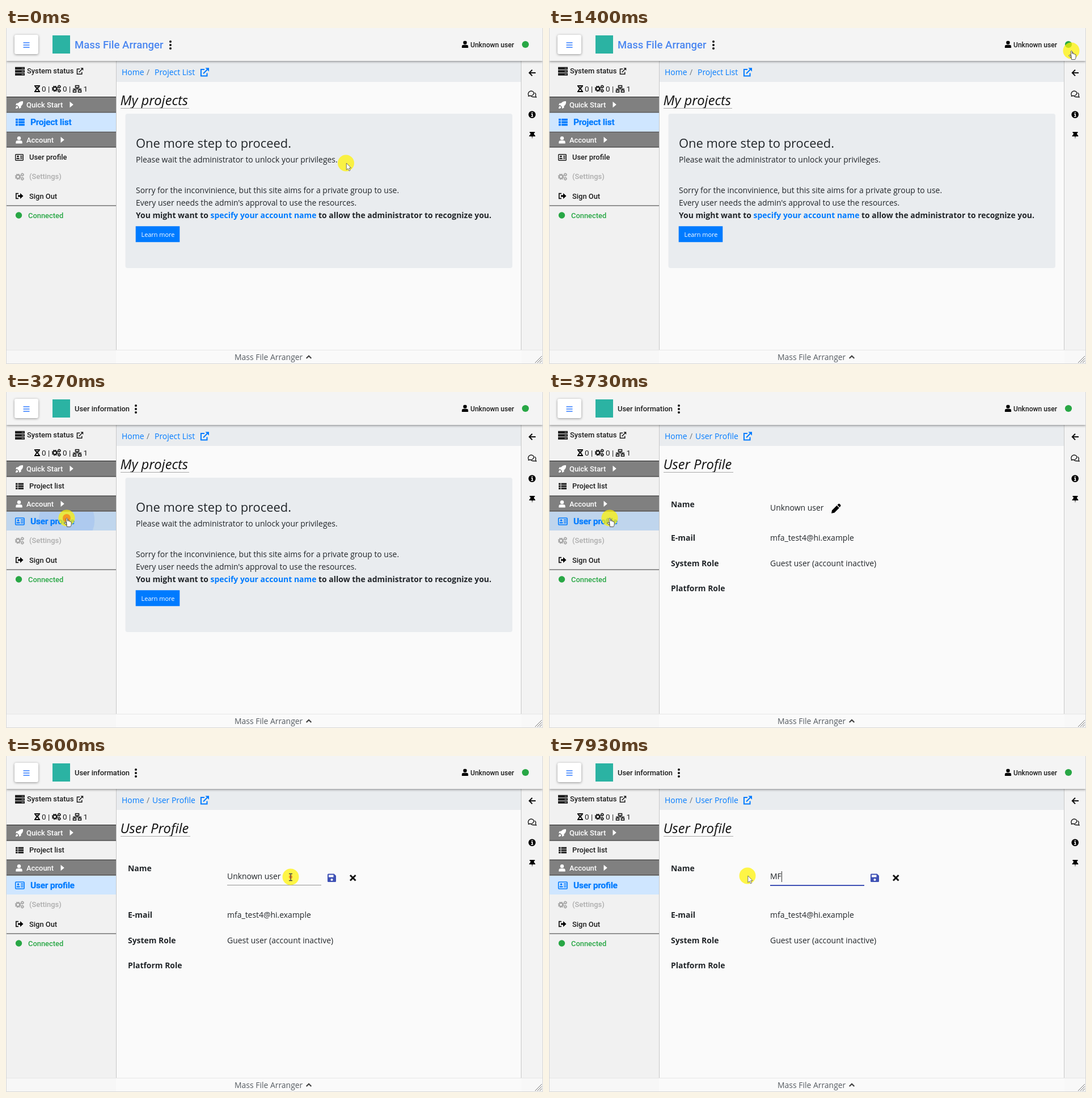
Write an HTML page that moves like this. It is 947x592 px and loops after 8 s.

```html
<!DOCTYPE html>
<html lang="en">
<head>
<meta charset="utf-8">
<title>User profile walkthrough</title>
<style>
html, body { margin: 0; width: 947px; height: 592px; overflow: hidden; background: #fafafa; }
svg { display: block; }
text { font: 13.95px "Open Sans", sans-serif; fill: #212529; white-space: pre; }
.ui text { font: 500 12.9px Roboto, sans-serif; fill: #1c1c1c; }
.bold { font-weight: 700; }
.head { font-size: 23.8px; font-style: italic; fill: #111; }
.link { fill: #007bff; }
.line { fill: none; stroke: #111; stroke-width: 1.7; }
.ui .light { fill: #fff; }
.ui .muted { fill: #adadad; color: #a5a5a5; }
.ui .green { fill: #28a745; }
.ui text.brand { font-size: 18.5px; fill: #4a86f0; }
.row { fill: none; }
.icon { transform-box: fill-box; transform-origin: 0 50%; }
.sel .row { fill: #cfe6ff; }
.sel .icon { transform: scale(1.13); color: #007bff; }
.sel text { font-size: 15.1px; fill: #007bff; transform: translate(2px, 1px); text-shadow: 0 0 2px #5aa9ff99, .4px 0 #007bff; }
</style>
</head>
<body>
<svg width="947" height="592" viewBox="0 0 947 592">
<defs>
  <symbol id="gears" viewBox="0 0 17 14" width="17" height="14">
    <g fill="none" stroke="currentColor">
      <circle cx="5.6" cy="7" r="3.2" stroke-width="2.4"/>
      <circle cx="5.6" cy="7" r="4.6" stroke-width="1.6" stroke-dasharray="2 1.61"/>
      <g id="cog"><circle cx="13.3" cy="3.4" r="1.8" stroke-width="1.5"/>
      <circle cx="13.3" cy="3.4" r="2.7" stroke-width="1" stroke-dasharray="1.4 1.43"/></g>
      <use href="#cog" y="7.2"/>
    </g>
  </symbol>
  <symbol id="external" viewBox="0 0 16 16" width="16" height="16">
    <path d="M8 3H1.9V14.4H12.5V9.5M6 10.3 13.5 2.6" fill="none" stroke="currentColor" stroke-width="2"/>
    <path d="M9.5.3H16V6.8Z" fill="currentColor"/>
  </symbol>
  <symbol id="person" viewBox="0 0 12 13" width="12" height="13">
    <circle cx="6" cy="3.3" r="3.2" fill="currentColor"/>
    <path d="M.3 12.6V10.5Q.3 7.4 3.3 7.3H8.7Q11.7 7.4 11.7 10.5V12.6Z" fill="currentColor"/>
  </symbol>
  <clipPath id="rowClip"><path d="M1 211H194V244H1Z"/></clipPath>
</defs>

<rect width="947" height="592" fill="#fafafa"/>
<path d="M0 58H194V592H0Z" fill="#f1f1f1"/>
<path d="M909 58H947V592H909Z" fill="#f3f3f3"/>
<path d="M195 58H908V95H195Z" fill="#e9ecef"/>
<path d="M194.5 58V567M908.5 58V567" stroke="#c8c8c8"/>
<path d="M0 0H947V58H0Z" fill="#f4f4f4" style="filter:drop-shadow(0 1px 2px #0007)"/>

<!-- header -->
<g class="ui">
  <rect x="15" y="12" width="42" height="34" rx="3" fill="#fff" style="filter:drop-shadow(0 1px 2px #0006)"/>
  <path d="M30.5 26H41.5M30.5 30H41.5M30.5 34H41.5" stroke="#2f7bff" stroke-width="1.6"/>
  <rect x="82" y="13" width="31" height="32" fill="#2bb3a3"/>
  <text id="title" x="121" y="36" class="brand">Mass File Arranger</text>
  <g id="dots" fill="#111"><circle cx="290" cy="24" r="2"/><circle cx="290" cy="30" r="2"/><circle cx="290" cy="36" r="2"/></g>
  <use href="#person" x="803.5" y="22.5"/>
  <text x="819" y="33.5" style="font-size:12.1px">Unknown user</text>
  <circle cx="916" cy="29" r="6.1" class="green"/>
</g>

<!-- sidebar -->
<g class="ui" color="#1c1c1c">
  <path d="M16 71H33M16 76.3H33M16 81.6H33" stroke="#1c1c1c" stroke-width="4.3"/>
  <path d="M28 71H31M28 76.3H31M28 81.6H31" stroke="#eee" stroke-width="1.2" stroke-dasharray="1"/>
  <text x="37" y="80">System status</text>
  <use href="#external" transform="translate(124 70) scale(.78)"/>
  <path d="M50 101H60V103H59Q59 105.5 56.2 107 59 108.5 59 111H60V113H50V111H51Q51 108.5 53.8 107 51 105.5 51 103H50Z"/>
  <path d="M52.5 103H57.5L57 104.3H53ZM53 111Q53 109 55 108.3 57 109 57 111Z" fill="#f1f1f1"/>
  <text y="112" style="font-weight:400;font-size:13.5px"><tspan x="63">0 |</tspan><tspan x="100">0 |</tspan><tspan x="136.5">1</tspan></text>
  <use href="#gears" x="80.5" y="100"/>
  <path d="M122.5 101.5H128.5V105H122.5ZM118.5 109.5H123.5V113H118.5ZM127.5 109.5H132.5V113H127.5Z" class="line" style="stroke-width:1.5"/>
  <path d="M125.5 105V107.3M118 107.3H133M121 107.3V109.5M130 107.3V109.5" class="line" style="stroke-width:1.2"/>

  <path d="M1 121.5H194V149H1ZM1 183H194V210H1Z" fill="#808080"/>
  <path d="M1 121.5H194M1 149H194M1 183H194M1 210H194" stroke="#222"/>
  <path d="M30 129Q24 128.5 21.5 132.5H18.5L17 136H20L23 139V142L26.5 140.5V137.5Q30.5 135 30 129ZM19.5 137.5Q17 138 17 142 21 142 21.5 139.5Z" class="light"/>
  <path d="M112.5 129.7V140.3L118.8 135ZM96.5 191.7V202.3L102.8 197Z" class="light"/>
  <text x="36" y="140" class="light">Quick Start</text>
  <use href="#person" x="17" y="191" color="#fff"/>
  <text x="36" y="202" class="light">Account</text>

  <g id="projects">
    <path d="M1 149.5H194V182.5H1Z" class="row"/>
    <path class="icon" d="M17 160.5H20.5V163.5H17ZM17 164.5H20.5V167.5H17ZM17 168.5H20.5V171.5H17ZM21.5 160.5H31V163.5H21.5ZM21.5 164.5H31V167.5H21.5ZM21.5 168.5H31V171.5H21.5Z" fill="currentColor"/>
    <text x="41" y="170">Project list</text>
  </g>
  <g id="profile">
    <path d="M1 211H194V244H1Z" class="row"/>
    <path id="hover" d="M1 211H194V244H1Z" opacity=".07"/>
    <circle id="ripple" cx="107" cy="226" fill="#0a62ff" clip-path="url(#rowClip)"/>
    <g class="icon">
      <rect x="16.7" y="222.7" width="13.6" height="10.6" rx="1" fill="none" stroke="currentColor" stroke-width="1.4"/>
      <circle cx="21" cy="226.3" r="1.7" fill="currentColor"/>
      <path d="M18.5 231V229H23.5V231ZM25 225H29V226.2H25ZM25 227.3H29V228.5H25ZM25 229.6H29V230.8H25Z" fill="currentColor"/>
    </g>
    <text x="41" y="232">User profile</text>
  </g>
  <g class="muted"><use href="#gears" x="15.5" y="255"/></g>
  <text x="41" y="266" class="muted">(Settings)</text>
  <path d="M22 291.7H17.8V300.3H22" class="line"/>
  <path d="M21 294.5H25V291L30.5 296 25 301V297.5H21Z"/>
  <text x="41" y="300.5">Sign Out</text>
  <path d="M0 313H194" stroke="#333"/>
  <circle cx="22.5" cy="330" r="5.7" class="green"/>
  <text x="39" y="334.5" class="green">Connected</text>
</g>

<!-- right tools -->
<path d="M934 79H923.5M928 73.8 922.8 79 928 84.2" class="line" style="stroke-width:2"/>
<path d="M922 119.5Q919.5 116 922.5 112.5 926 109.5 930 112.5 932 116 928.5 118.5 926 120 923.5 119.3L920.8 120.3ZM932 114Q935.5 116 933.8 119L935 122 931.5 121.3Q928 122 926 120" class="line" style="stroke-width:1.3"/>
<circle cx="927.7" cy="152.5" r="6.3"/>
<path d="M926 151.7H928.3V155.5M926 155.7H929.7M926.7 149.3H928.8" fill="none" stroke="#fff" stroke-width="1.5"/>
<path d="M923.5 183H932.5V185H931L931.5 188Q933.5 189 933.5 191H928.6L928 195.5 927.3 191H922.5Q922.5 189 924.5 188L925 185H923.5Z"/>

<!-- breadcrumb and heading -->
<text x="204" y="83" class="link">Home</text>
<text x="248" y="83" style="fill:#6c757d">/</text>
<text id="crumb" y="83" class="link"></text>
<use href="#external" x="342" y="70" color="#007bff"/>
<text id="heading" x="201.5" y="136" class="head"></text>
<path id="underline" stroke="#aaa"/>

<!-- project list page -->
<g id="listPage">
  <rect x="210.5" y="151" width="682.5" height="272" rx="4" fill="#e9ecef"/>
  <text x="229" y="210.5" style="font-size:21.9px">One more step to proceed.</text>
  <text x="229" y="237">Please wait the administrator to unlock your privileges.</text>
  <text x="229" y="290.5">Sorry for the inconvinience, but this site aims for a private group to use.</text>
  <text x="229" y="313">Every user needs the admin's approval to use the resources.</text>
  <text x="229" y="335" class="bold">You might want to <tspan class="link">specify your account name</tspan> to allow the administrator to recognize you.</text>
  <path d="M228.7 349.2H306.3V377.3H228.7Z" class="link"/>
  <text x="238.5" y="367.8" style="font-size:10.9px;fill:#fff">Learn more</text>
</g>

<!-- profile page -->
<g id="profilePage">
  <text x="215" y="203" class="bold">Name</text>
  <rect id="selection" y="203" height="19" fill="#2f7fe0"/>
  <text id="name" x="390" y="208.5"></text>
  <path id="caret" d="M0 203V222" stroke="#333"/>
  <path id="pencil" d="M498 213.8 499 208.5 507.5 200 511.8 204.3 503.3 212.8ZM508.5 199 510.3 197.2Q511.5 196.3 512.8 197.5L514 198.8Q515 200 514 201.2L512.7 203.3Z"/>
  <g id="editor">
    <path d="M390 227.5H556" stroke="#949494"/>
    <path id="focusLine" stroke="#3f51b5" stroke-width="2"/>
    <path d="M568.5 207.5H578.5L582 211V220.5Q582 222 580.5 222H568.5Q567 222 567 220.5V209Q567 207.5 568.5 207.5Z" fill="#3f51b5"/>
    <path d="M569 209.5H577.5V213.5H569Z" fill="#fafafa"/><circle cx="574.5" cy="218" r="2.1" fill="#fafafa"/>
    <path d="M607 210 616.5 219.5M616.5 210 607 219.5" stroke="#111" stroke-width="3"/>
  </g>
  <g id="details">
    <text y="262"><tspan x="215" class="bold">E-mail</tspan><tspan x="390">mfa_test4@hi.example</tspan></text>
    <text y="306.5"><tspan x="215" class="bold">System Role</tspan><tspan x="390">Guest user (account inactive)</tspan></text>
    <text x="215" y="350.5" class="bold">Platform Role</text>
  </g>
</g>

<!-- footer and frame -->
<path d="M0 567H947V592H0Z" fill="#fafafa" opacity=".75"/>
<path d="M0 567.5H947" stroke="#e6e6e6"/>
<text x="403" y="585" style="fill:#555b61">Mass File Arranger</text>
<path d="M529.7 582 534 577.8 538.3 582" fill="none" stroke="#444" stroke-width="2.3"/>
<path d="M933 590 945 578M937 590 945 582M941 590 945 586" stroke="#777"/>
<path d="M.5 0V591.5H946.5V0" fill="none" stroke="#d6d6d6"/>

<!-- pointer -->
<g id="pointer">
  <circle r="14.5" fill="#fff200" opacity=".72"/>
  <circle id="press" fill="#f58a1f" opacity=".85"/>
  <g stroke-linejoin="round">
    <path id="arrow" d="M.8 0V12L3.6 9.5 5.5 13.8 7.5 12.9 5.6 8.7H9.2Z" fill="#fff" stroke="#555" stroke-width=".8"/>
    <path id="hand" d="M-.8 1Q.3-.8 1.5 1V5.5Q3-.1 4 6 5.5 4.5 6.2 6.5 8.2 5.8 8.2 8V11Q8 13.5 6.7 15.5H.5Q-1-.1-.8 12.5L-4 9Q-4 7-2.3 7.5L-.8 9Z" fill="#fff" stroke="#444" stroke-width=".9"/>
    <path id="ibeam" d="M-3-5.5H3M0-5.5V6.5M-3 6.5H3" fill="none" stroke="#444" stroke-width="1.3"/>
  </g>
</g>
</svg>
<script>
const el = Object.fromEntries([...document.querySelectorAll('[id]')].map(node => [node.id, node]));
const LOOP = 8000, FPS = 15;
const CLICK = 3130, EDIT = 5060, FOCUS = 5660, CLEAR = 6190;

// time, x, y of the pointer
const path = [
  [267, 599.5, 238], [800, 774, 42], [1005, 774, 42], [1400, 921, 40], [1730, 921, 40],
  [1800, 903, 66], [1867, 726, 66], [1933, 674, 47.5], [2150, 674, 47.5], [2867, 107, 222],
  [3930, 107, 222], [4400, 521, 212], [4600, 521, 212], [4870, 507, 201], [5130, 507, 201],
  [5530, 502, 213], [5610, 502, 213], [6130, 350, 211], [LOOP, 350, 211]
];
const presses = [[CLICK, 3400], [4900, EDIT], [5560, 6140]];

const clamp = v => Math.max(0, Math.min(1, v));
const ease = v => v * v * (3 - 2 * v);
const show = (node, on) => node.style.display = on ? '' : 'none';
const set = (node, attrs) => { for (const k in attrs) node.setAttribute(k, attrs[k]); };

function pointerAt(t) {
  const i = Math.max(1, path.findIndex(p => p[0] > t));
  const [a, b] = [path[i - 1], path[i]];
  const k = ease(clamp((t - a[0]) / (b[0] - a[0])));
  return [a[1] + (b[1] - a[1]) * k, a[2] + (b[2] - a[2]) * k];
}

function drawPage(t, x, y) {
  const chosen = t >= 3190, onProfile = t >= 3460, editing = t >= EDIT;
  el.projects.classList.toggle('sel', !chosen);
  el.profile.classList.toggle('sel', chosen);
  show(el.hover, x < 194 && y > 211);
  set(el.ripple, { r: Math.max(0, t - CLICK) * .36, opacity: t < CLICK ? 0 : .1 * (1 - clamp((t - 3400) / 350)) });

  el.title.textContent = chosen ? 'User information' : 'Mass File Arranger';
  el.title.setAttribute('class', chosen ? '' : 'brand');
  set(el.title, { y: chosen ? 34 : 36 });
  set(el.dots, { transform: `translate(${chosen ? -61 : 0} 0)` });
  el.crumb.textContent = onProfile ? 'User Profile' : 'Project List';
  set(el.crumb, { x: onProfile ? 258 : 262 });
  el.heading.textContent = onProfile ? 'User Profile' : 'My projects';
  set(el.underline, { d: `M202 141.5H${onProfile ? 325 : 323}` });
  show(el.listPage, !onProfile);
  show(el.profilePage, onProfile);
  show(el.pencil, !editing);
  show(el.editor, editing);
  set(el.details, { transform: `translate(0 ${editing ? 23 : 0})` });
  drawName(t, x, editing);
}

function drawName(t, x, editing) {
  el.name.textContent = t < CLEAR ? 'Unknown user' : 'MF'.slice(0, t < 7660 ? 0 : t < 7925 ? 1 : 2);
  const width = el.name.textContent ? el.name.getComputedTextLength() : 0;
  const end = 390 + width, start = Math.max(390, x);
  const selecting = t >= FOCUS && t < CLEAR && start < end;
  set(el.name, { y: editing ? 217 : 208.5 });
  el.name.style.fill = selecting && start < 437 ? '#fff' : '';
  show(el.selection, selecting);
  set(el.selection, { x: start, width: Math.max(0, end - start) });
  show(el.caret, t >= CLEAR && (t < 6725 || t >= 7260));
  set(el.caret, { transform: `translate(${Math.round(end) + .5} 0)` });
  const half = 83 * ease(clamp((t - 5610) / 250));
  show(el.focusLine, half > 0);
  set(el.focusLine, { d: `M${473 - half} 228H${473 + half}` });
}

function drawPointer(t, x, y) {
  const overLink = x > 905 || (x < 194 && y > 211) || (t > CLICK && t < EDIT && x > 495 && x < 530);
  const overInput = t >= EDIT && x > 390;
  show(el.hand, overLink);
  show(el.ibeam, overInput && !overLink);
  show(el.arrow, !overLink && !overInput);
  const press = presses.find(([from, to]) => t >= from && t < to);
  set(el.press, { r: press ? 7 * clamp((t - press[0]) / 90) : 0 });
  set(el.pointer, { transform: `translate(${x} ${y})` });
}

const begin = performance.now();
function frame() {
  const ms = (performance.now() - begin) % LOOP;
  const t = Math.floor(ms * FPS / 1000 + .07) * 1000 / FPS;
  const [x, y] = pointerAt(Math.min(t, LOOP - 1));
  drawPage(t, x, y);
  drawPointer(t, x, y);
  requestAnimationFrame(frame);
}
frame();
</script>
</body>
</html>
```
